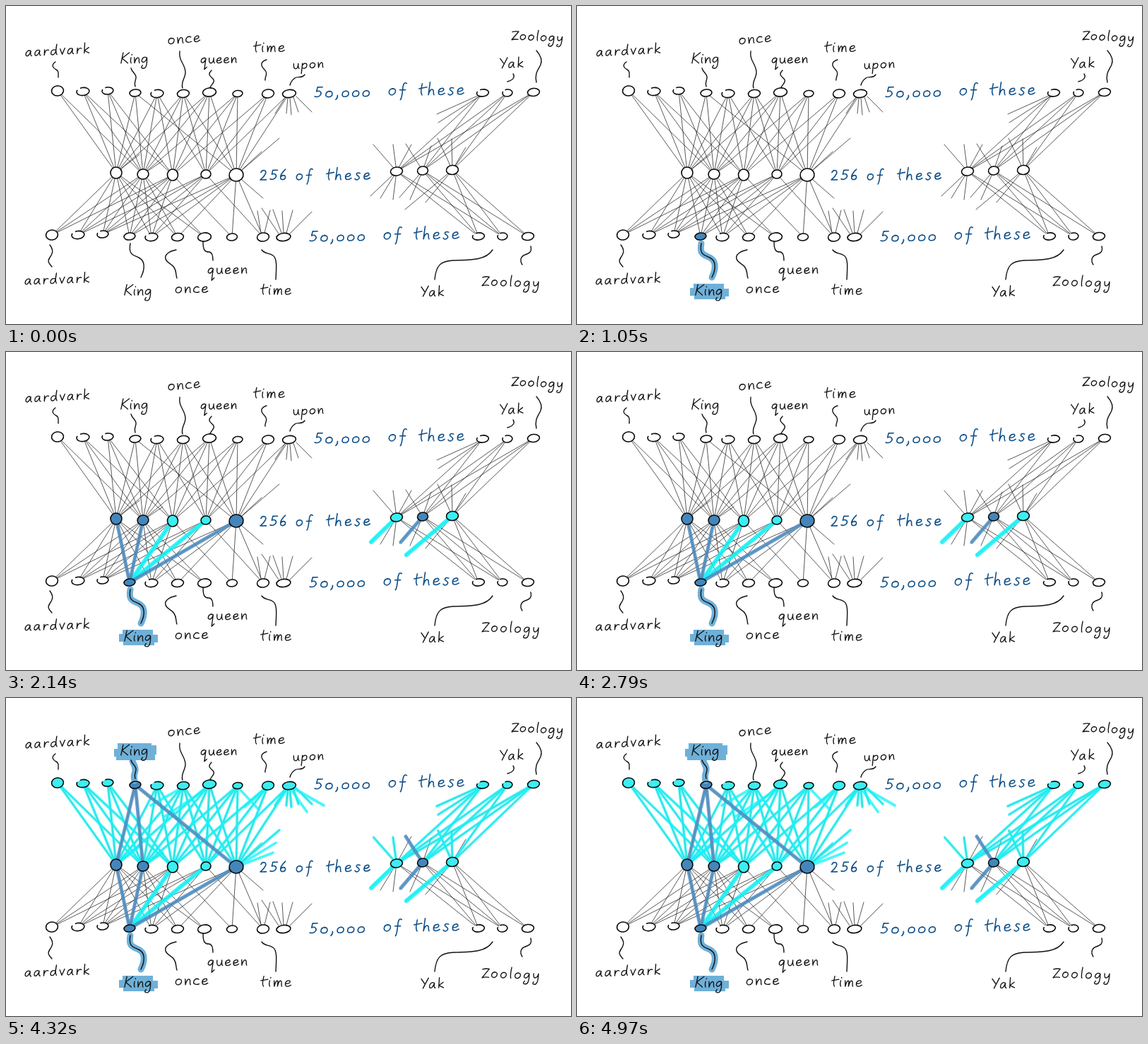
Recreate the animation shown at these times as an HTML page. Size 800x450 px, loop 5410 ms.

```html
<!DOCTYPE html>
<html lang="en">
<head>
<meta charset="utf-8">
<title>Word network</title>
<style>
html, body { margin: 0; width: 100%; height: 100%; overflow: hidden; background: #fff; }
svg { display: block; width: 800px; height: 450px; }
path, ellipse { fill: none; stroke-linecap: round; stroke-linejoin: round; }
.word path { vector-effect: non-scaling-stroke; stroke: #111; stroke-width: 1.35; }
.note path { stroke: #0f4f88; stroke-width: 1.6; }
.link { stroke: #222; stroke-width: .75; }
.node { stroke: #080808; stroke-width: 1.6; }
.open { stroke-dasharray: 56 13 31 0; }
.lead { stroke: #111; stroke-width: 1.4; }
.cyan { stroke: #14f4f8; stroke-width: 3.8; stroke-opacity: .76; }
.bold { stroke-width: 6; stroke-opacity: .88; }
.blue { stroke: #4a8cc2; stroke-width: 5; stroke-opacity: .84; }
.trail { stroke: #6fb0d8; stroke-width: 9; }
.box { fill: #6fb0d8; }
.fillWhite { fill: #fff; }
.fillCyan { fill: #3ceef2; }
.fillBlue { fill: #4486bb; }
.step { opacity: 0; animation: 5410ms step-end infinite; }
#input { animation-name: input; }
#hidden { animation-name: hidden; }
#output { animation-name: output; }
#answer { animation-name: answer; }
@keyframes input { 0% { opacity: 0 } 19.4085%, 100% { opacity: 1 } }
@keyframes hidden { 0% { opacity: 0 } 39.5564%, 100% { opacity: 1 } }
@keyframes output { 0% { opacity: 0 } 59.7043%, 100% { opacity: 1 } }
@keyframes answer { 0% { opacity: 0 } 79.8521%, 100% { opacity: 1 } }
</style>
</head>
<body>
<svg viewBox="0 0 800 450">
  <g id="links"></g>
  <g id="output" class="step"></g>
  <g id="hidden" class="step"></g>
  <g id="input" class="step"></g>
  <g id="answer" class="step"></g>
  <g id="ink"></g>
</svg>
<script>
// Pen strokes per letter: advance, then path (baseline 0, x-height 10)
const glyphs = {
  a: [12, 'M8-8C4-11 0-7 0-3S5 2 8-8Q7 0 10 0'],
  c: [11, 'M8-8C3-11 0-7 0-4S4 1 9-1'],
  d: [12, 'M8-7C4-10 0-7 0-3S6 2 8-6L9-17Q7-4 10 0'],
  e: [11, 'M0-4C6-4 8-6 7-8S0-9 0-4 5 1 9-2'],
  f: [11, 'M9-16C5-19 4-14 4-8S4 5 2 7M0-7H8'],
  g: [12, 'M8-8C4-11 0-8 0-4S6 1 8-8C9 0 9 9 4 9S0 6 2 4'],
  h: [12, 'M2-18L1 0C2-7 5-9 7-7S7-2 9 0'],
  i: [5, 'M1-9Q0-3 2 0M2-14v1'],
  k: [11, 'M1-17V0M8-9L1-4 9 0'],
  K: [14, 'M3-17L1 0M13-17L2-8 12 0'],
  l: [5, 'M1-18Q0-3 2 0'],
  m: [15, 'M0-9L1 0C2-7 4-10 6-8V0C7-7 9-10 11-8S11-2 13 0'],
  n: [11, 'M0-9L1 0C2-7 5-10 7-8S7-2 9 0'],
  o: [12, 'M5-9C1-9 0-6 0-4S2 0 4 0 9-2 9-5 7-9 4-9'],
  p: [12, 'M1-9L0 9M1-5C3-10 9-10 9-5S4 1 1-1'],
  q: [12, 'M8-8C4-11 0-8 0-4S6 1 8-8L7 11 11 7'],
  r: [9, 'M1-9V0C1-6 4-10 8-8'],
  s: [10, 'M7-9C3-11 0-8 3-6S8-2 5 0 1 0 0-1'],
  t: [10, 'M4-16Q2-3 5 0M0-9L11-11'],
  u: [12, 'M0-9C0-3 1 0 4 0S8-4 8-9Q8-2 10 0'],
  v: [10, 'M0-9L4 0 8-10'],
  y: [11, 'M0-9C0-3 2-1 4-2S8-5 8-9C9 2 8 9 4 9S0 7 2 5'],
  Y: [12, 'M0-16L6-8M12-17L4 0'],
  z: [11, 'M-2-13Q4-15 9-14L-1 1Q5-1 10 0'],
  0: [12, 'M5-8C1-8 0-5 0-3S2 0 4 0 9-1 9-4 7-8 4-8'],
  2: [13, 'M0-11C2-16 9-14 7-9S2-2 0 0H9'],
  5: [13, 'M10-14H3L2-8C7-10 10-6 8-3S2 0 0-1'],
  6: [12, 'M7-15C2-10 0-5 1-2S8 1 8-3 3-7 1-4'],
  ',': [6, 'M2-2Q3 1 0 4']
};

const node = (x, y, rx = 8, ry = 5.5) => ({ x, y, rx, ry });
const high = [
  node(73, 120, 8.5, 7), node(109, 121, 9), node(144, 120, 8, 5), node(183, 123, 8, 5),
  node(214, 124, 9), node(251, 124, 8.5), node(288, 122, 9.5, 6), node(328, 124, 7, 4.5),
  node(371, 124, 8.5, 6), node(401, 124, 9.5), node(675, 123, 8.5, 5), node(710, 123, 7, 5), node(747, 122, 8.5)
];
const mid = [
  node(156, 236, 8, 8), node(194, 238, 8, 7), node(236, 239, 7.5, 8), node(283, 238, 7, 6),
  node(326, 239, 10, 9), node(553, 234, 8.5, 6), node(590, 233, 7.5, 6), node(632, 232, 8.5, 6.5)
];
const low = [
  node(65, 324, 8.5, 7), node(102, 324, 9), node(137, 323, 8, 5), node(175, 326, 8, 5),
  node(206, 327, 9), node(243, 327, 8.5), node(281, 327, 9.5, 6), node(320, 327, 7.5, 5),
  node(364, 327, 8.5, 6), node(393, 327, 10), node(669, 326, 8.5, 5), node(703, 326, 7, 5), node(739, 326, 8.5)
];
const loose = [1, 2, 4, 10, 11]; // loops left unclosed in the outer rows

// Links of each middle node, as hex indices
const upLinks = ['0123456', '01234567', '1245678', '456789', '356789', 'abc', 'abc', 'bc'];
const downLinks = ['0123456', '0123456', '012347', '12348', '234578', 'ab', 'abc', 'abc'];

const upStubs = 'M395 130L381 152M399 130L397 152M402 130L404 154M407 129L414 150M411 128L433 150' +
  'M326 239L387 187M326 239L362 206M668 127L610 153M670 128L612 165M156 236L189 210M194 238L222 219';
const sideStubs = 'M553 234L520 196M553 234L548 196M553 234L574 196M590 233L566 195M590 233L602 198' +
  'M632 232L611 187M632 232L631 188M632 232L651 200';
const downStubs = 'M553 234L516 269M553 234L530 272M553 234L548 274M590 233L557 271M590 233L572 274' +
  'M632 232L565 288M632 232L594 278M326 239L364 272M361 321L356 290M366 321L374 289' +
  'M386 322L362 286M390 321L378 288M393 321L391 290M397 321L406 289M402 322L433 291';

const leads = [
  'M70 79c-7 5-3 9 1 11s3 6 3 11', 'M177 88c2 7 8 8 7 14s-3 6-1 12',
  'M246 64c-2 14 8 18 8 30c0 8-7 14-4 22', 'M291 91c-6 6-2 8 2 12s-2 8-4 12',
  'M369 76c-9 3-9 8-3 14s0 10 1 15', 'M423 97c-4 6-10 2-14 5s-6 6-7 10',
  'M718 96c4 6-3 10-8 11', 'M751 63c6 7 9 13 6 20s-9 12-6 25',
  'M62 338c6 8 4 12 0 18s-1 8 3 13', 'M241 345c-10 2-17 7-15 13s8 6 12 12 2 10 4 15',
  'M279 334c0 12 3 14 8 14s6 6 6 12', 'M362 345c4 6 10 4 16 8s5 16 4 34',
  'M607 387c2-20 8-26 26-27s45 2 56-15', 'M743 340c2 8-2 10-8 12s-8 8-4 14'
];
const kingLow = 'M176 336c-3 16 4 16 12 20s10 14 3 28';

const $ = id => document.getElementById(id);
function add(parent, tag, attrs) {
  const el = document.createElementNS('http://www.w3.org/2000/svg', tag);
  for (const key in attrs) el.setAttribute(key, attrs[key]);
  return parent.appendChild(el);
}
const stroke = (parent, cls, d) => add(parent, 'path', { class: cls, d });
const line = (a, b) => `M${a.x} ${a.y}L${b.x} ${b.y}`;
const oval = (parent, cls, n) => add(parent, 'ellipse', {
  class: cls, rx: n.rx, ry: n.ry, pathLength: 100, transform: `translate(${n.x} ${n.y}) rotate(-7)`
});

function write(word, x, y, size, gap, tilt = 0, cls = '') {
  const g = add($('ink'), 'g', {
    class: 'word ' + cls, role: 'img', 'aria-label': word,
    transform: `translate(${x} ${y}) rotate(${tilt}) skewX(-6)`
  });
  let pen = 0;
  for (const ch of word) {
    const [advance, d] = glyphs[ch];
    add(g, 'path', { d, transform: `translate(${pen} 0) scale(${size})` });
    pen += advance * size + gap;
  }
}
const note = (word, x, y, size, gap) => write(word, x, y, size, gap, -1, 'note');

function eachLink(table, row, draw) {
  table.forEach((list, m) => {
    for (const c of list) draw(row[parseInt(c, 16)], mid[m]);
  });
}

// Thin network lines, kept out of the node loops
const links = $('links');
eachLink(upLinks, high, (a, b) => stroke(links, 'link', line(a, b)));
eachLink(downLinks, low, (a, b) => stroke(links, 'link', line(b, a)));
[upStubs, sideStubs, downStubs].forEach(d => stroke(links, 'link', d));
[...high, ...mid, ...low].forEach(n => oval(links, 'fillWhite', n));

// Pen drawing above the highlighter
const ink = $('ink');
[...leads, kingLow].forEach(d => stroke(ink, 'lead', d));
mid.forEach(n => oval(ink, 'node', n));
[high, low].forEach(row => row.forEach((n, i) =>
  oval(ink, loose.includes(i) ? 'node open' : 'node', n)));

write('aardvark', 28, 71, .85, 2.5, -3);
write('King', 162, 81, .87, 1.3, -1);
write('once', 230, 54, .9, 2, -5);
write('queen', 276, 81, .8, 1.5, -1);
write('time', 350, 65, .9, 3, -1);
write('upon', 407, 89, .8, 2, -3);
write('Yak', 699, 88, .85, 2.5, -3);
write('zoology', 717, 47, .8, 2, 3);
write('aardvark', 27, 394, .85, 2.6, -2);
write('King', 167, 409, .87, 1.3);
write('once', 240, 406, .9, 2.3, -1);
write('queen', 286, 379, .85, 2, -1);
write('time', 360, 408, .9, 2.7);
write('Yak', 587, 411, .85, 2.2, -2);
write('zoology', 675, 395, .85, 2.8, 2);

for (const [x, y] of [[437, 129], [430, 333]]) {
  note('50,000', x, y, 1, 2.6);
  note('of', x + 105, y - 3, 1, 3);
  note('these', x + 147, y - 3, 1, 3);
}
note('256', 360, 246, .95, 1.5);
note('of', 411, 246, .9, 3);
note('these', 453, 246, .95, 3.2);

// Highlighter: chosen input word
const king = low[3];
stroke($('input'), 'trail', kingLow);
oval($('input'), 'fillBlue', king);
stroke($('input'), 'box', 'M165 393H208V400H215V411H210V415H166V410H160V399H165Z');

// Highlighter: middle row
const hidden = $('hidden');
const active = [0, 1, 4, 6];
const tint = m => active.includes(m) ? 'Blue' : 'Cyan';
[2, 3].forEach(m => stroke(hidden, 'cyan bold', line(mid[m], king)));
[0, 1, 4].forEach(m => stroke(hidden, 'blue', line(mid[m], king)));
stroke(hidden, 'cyan bold', 'M553 234L517 269M632 232L567 287');
stroke(hidden, 'blue', 'M590 233L559 269');
mid.forEach((n, m) => oval(hidden, 'fill' + tint(m), n));

// Highlighter: upper row
const output = $('output');
const lit = high[3];
eachLink(upLinks, high, (a, b) => {
  if (a !== lit) stroke(output, 'cyan', line(a, b));
});
stroke(output, 'cyan', upStubs);
stroke(output, 'cyan', 'M408 128L450 152M404 130L426 161M326 239L382 205M326 239L378 219' +
  'M251 126L205 152M288 126L224 168M328 126L358 158M371 126L338 154' +
  'M553 234L521 198M553 234L548 198M632 232L612 188M632 232L631 192');
[0, 1, 4].forEach(m => stroke(output, 'blue', line(lit, mid[m])));
stroke(output, 'blue', 'M566 196L590 233');
high.forEach(n => oval(output, n === lit ? 'fillBlue' : 'fillCyan', n));

// Highlighter: matching output word
stroke($('answer'), 'trail', 'M179 89c2 6 5 8 4 14s-3 6-1 14');
stroke($('answer'), 'box', 'M158 64H206V67H213V80H211V88H156V83H153V72H158Z');
</script>
</body>
</html>
```
